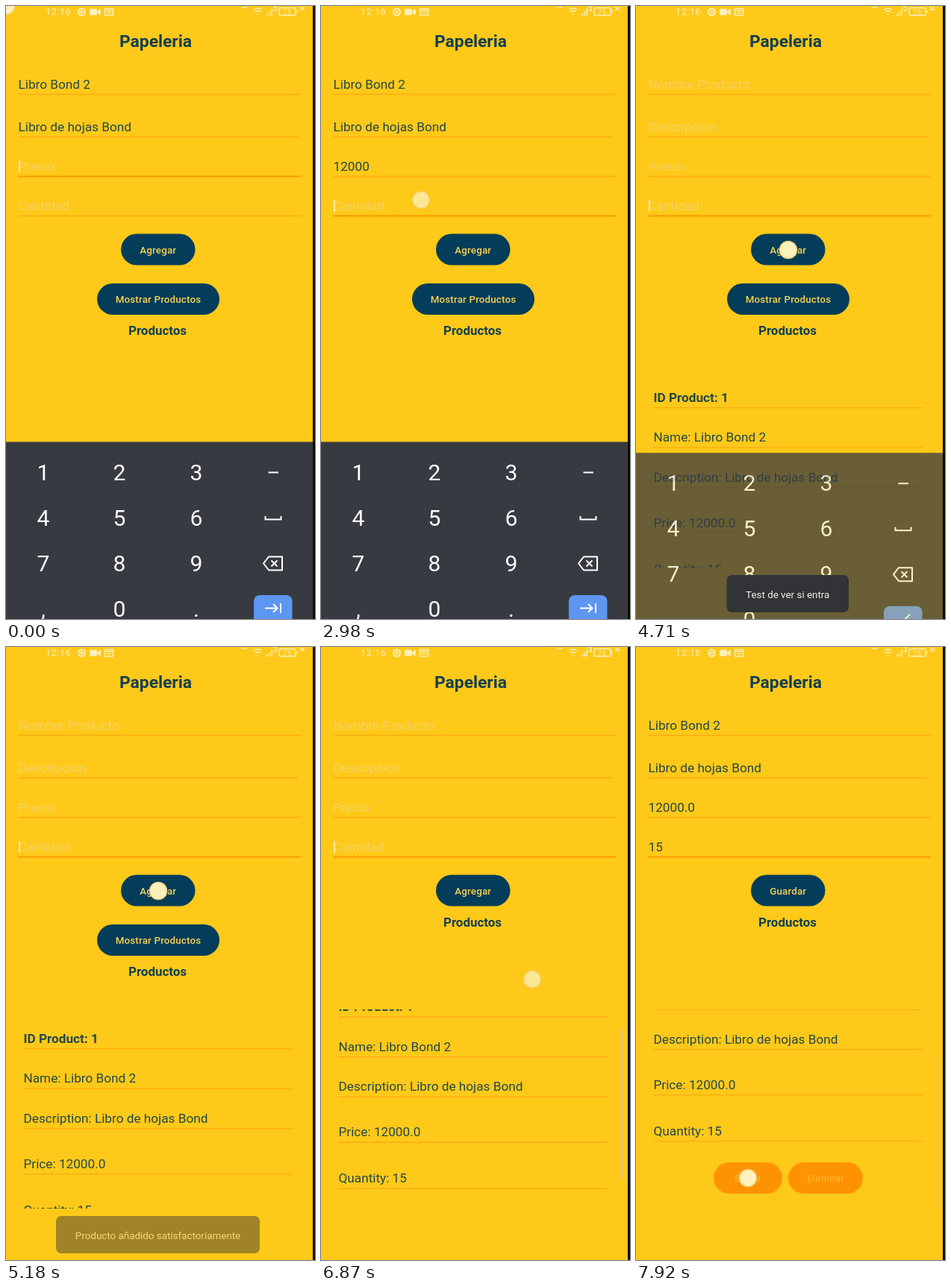
These frames come from a looping animation (414x822 px, 7990 ms). An HTML page:

```html
<!DOCTYPE html>
<html lang="es">
<head>
<meta charset="utf-8">
<title>Papeleria</title>
<style>
  html, body { margin: 0; width: 100%; height: 100%; overflow: hidden; background: #fec919; }
  svg { display: block; width: 414px; height: 822px; }
  text { font-family: Roboto, Arial, sans-serif; font-size: 17.2px; fill: #23474d; }
  .bold { font-weight: 700; fill: #123f50; text-anchor: middle; }
  .button { font-size: 13.3px; font-weight: 500; letter-spacing: .2px; fill: #fad252; text-anchor: middle; }
  .toast { font-size: 13.4px; fill: #f2eee6; text-anchor: middle; }
  .key { font-size: 30px; fill: #fff; text-anchor: middle; }
  .icon { fill: none; stroke: #fff; stroke-width: 2; }
  .status { fill: none; stroke: #fff0bd; stroke-width: 1.5; }
  .status text { font-size: 12.5px; fill: #fff0bd; stroke: none; letter-spacing: .6px; }
</style>
</head>
<body>
<svg id="stage" viewBox="0 0 414 822">
  <defs>
    <clipPath id="viewport"><rect y="486" width="411" height="267"/></clipPath>
  </defs>
  <rect width="414" height="822" fill="#fec919"/>
  <g class="status">
    <text x="53" y="12">12:16</text>
    <circle cx="101.500" cy="8" r="4.500" stroke-width="2"/>
    <circle cx="101.500" cy="8" r="1.500"/>
    <path d="M113 4.500h8v7h-8zM122 8l4-3v6z" fill="#fff0bd"/>
    <path d="M132.500 3.500h11v9h-11zM132 6h12M135 9h6"/>
    <path d="M316 2h7M332 5q5.500-4 11 0M334 8q3.500-2.500 7 0M337.500 10v2M350 13v-3M353 13V7M356 13V3M358 1h4v5h-4M394 1l6 5M400 1l-6 5"/>
    <rect x="366" y="2.500" width="22" height="10" rx="2"/>
    <path d="M390 6v3"/>
    <text x="371" y="11.500" style="font-size:9px">75</text>
  </g>
  <text class="bold" x="200.500" y="54.500" style="font-size:22.800px">Papeleria</text>
  <g id="form"></g>
  <g id="add"></g>
  <g id="show"></g>
  <text id="heading" class="bold" x="203" y="441" style="font-size:16.900px">Productos</text>
  <g id="list" clip-path="url(#viewport)">
    <path id="glow" d="M4 486H402Q398 496 378 498Q330 523 210 524Q80 523 28 499Q8 496 4 486Z" fill="#f6c33b"/>
    <g id="rows"></g>
    <rect id="bar" x="400" width="6" height="199" fill="#f0c55c"/>
  </g>
  <g id="keyboard">
    <rect y="584.500" width="411" height="240" fill="#373a40"/>
    <g id="keys"></g>
    <path class="icon" d="M351.500 625.500H365M347.500 684v4.500h21V684"/>
    <path class="icon" stroke-linejoin="round" d="M352 738.500h18v18h-18l-7-9zM355.500 743.500l8 8M363.500 743.500l-8 8"/>
    <rect x="332" y="790" width="51.500" height="50" rx="8" fill="#5e96f1"/>
    <path id="next" class="icon" d="M347 807.500h16M358 802l5.500 5.500-5.500 5.500M368 801v13"/>
    <path id="done" class="icon" d="M348 808l6 6 13-13"/>
  </g>
  <g id="toasts"></g>
  <circle id="touch" r="11.500" fill="#fff1bd" stroke="#edcf78" stroke-width="1.500"/>
  <rect x="411" width="3" height="822" fill="#0d0c07"/>
</svg>
<script>
const LOOP = 7990;
const $ = id => document.getElementById(id);

function add(parent, tag, attrs, text) {
  const node = document.createElementNS('http://www.w3.org/2000/svg', tag);
  for (const name in attrs) node.setAttribute(name, attrs[name]);
  if (text) node.textContent = text;
  return parent.appendChild(node);
}
const set = (node, name, value) => node.setAttribute(name, value);
const ramp = (t, from, to) => Math.min(1, Math.max(0, (t - from) / (to - from)));
const fade = (t, a, b, c, d) => ramp(t, a, b) * (1 - ramp(t, c, d));
const show = (node, visible) => set(node, 'opacity', +visible);

const fields = [
  { y: 105, line: 118.5, end: 395, hint: 'Nombre Producto' },
  { y: 162, line: 175.5, end: 391, hint: 'Descripcion' },
  { y: 215, line: 228.5, end: 395, hint: 'Precio' },
  { y: 268, line: 281.5, end: 395, hint: 'Cantidad' }
].map(field => ({
  ...field,
  label: add($('form'), 'text', { x: 16.5, y: field.y + 5.8 }),
  underline: add($('form'), 'path', { d: `M16.500 ${field.line}H${field.end}` })
}));
const caret = add($('form'), 'rect', { x: 17, width: 2, height: 16, fill: '#ffe9a4' });

function button(parent, x, y, width, label, fill = '#033d59', color = '#fad252') {
  add(parent, 'rect', { x, y, width, height: 42, rx: 21, fill });
  return add(parent, 'text', { class: 'button', x: x + width / 2, y: y + 26, style: `fill:${color}` }, label);
}
const addLabel = button($('add'), 154, 305.5, 99.5, 'Agregar');
button($('show'), 122, 372, 164, 'Mostrar Productos');

[
  [527, 'ID Product: 1'],
  [580.5, 'Name: Libro Bond 2'],
  [634, 'Description: Libro de hojas Bond'],
  [695, 'Price: 12000.0'],
  [757, 'Quantity: 15']
].forEach(([y, label], i) => {
  add($('rows'), 'text', { x: 23.5, y: y + 5.8, 'font-weight': i ? 400 : 700 }, label);
  add($('rows'), 'path', { d: `M23 ${y + 13.7}H384`, stroke: '#fcab13', 'stroke-width': 1.3 });
});
button($('rows'), 104, 799, 92, 'Editar', '#ff9200', '#ffb42c');
button($('rows'), 204, 799, 100, 'Eliminar', '#ff9200', '#ffb42c');

['123', '456', '789', ',0.'].forEach((row, r) => [...row].forEach((key, c) =>
  add($('keys'), 'text', { class: 'key', x: [50, 152, 255][c], y: 635.5 + r * 61 }, key)));

function toast(x, width, label) {
  const group = add($('toasts'), 'g', {});
  add(group, 'rect', { x, y: 763, width, height: 50, rx: 7, fill: '#323336' });
  add(group, 'text', { class: 'toast', x: x + width / 2, y: 793.5 }, label);
  return group;
}
const testToast = toast(121.5, 163.5, 'Test de ver si entra');
const savedToast = toast(67, 273, 'Producto añadido satisfactoriamente');

// start, end, x, y, vertical travel
const touches = [
  [1600, 1690, 50, 625, 0],
  [1840, 1930, 152, 625, 0],
  [2100, 2190, 152, 808, 0],
  [2310, 2400, 152, 808, 0],
  [2520, 2610, 152, 808, 0],
  [2900, 3040, 134, 260, 0],
  [3250, 3330, 50, 625, 0],
  [3660, 3750, 152, 686, 0],
  [4010, 4120, 204, 327, 0],
  [5430, 5550, 290, 575, 52],
  [6330, 6430, 204, 393, 0],
  [6778, 6960, 283, 490, -87],
  [7600, 7700, 150, 712, 0]
];
const priceKeys = [1620, 1860, 2120, 2330, 2540];

function fieldValues(t) {
  if (t >= 7740) return ['Libro Bond 2', 'Libro de hojas Bond', '12000.0', '15'];
  if (t >= 4230) return ['', '', '', ''];
  const typed = priceKeys.filter(at => t >= at).length;
  return ['Libro Bond 2', 'Libro de hojas Bond', '12000'.slice(0, typed),
    t < 3260 ? '' : t < 3750 ? '1' : '15'];
}

function drawForm(t) {
  const values = fieldValues(t);
  const focus = t < 2940 ? 2 : 3;
  fields.forEach((field, i) => {
    field.label.textContent = values[i] || field.hint;
    field.label.style.fill = values[i] ? '#23474d' : '#f5d266';
    set(field.underline, 'stroke', i === focus ? '#fa9902' : '#fcab13');
    set(field.underline, 'stroke-width', i === focus ? 2 : 1.3);
  });
  const blinkedOff = (t >= 670 && t < 1170) || (t >= 1470 && t < 1600);
  show(caret, !values[focus] && !blinkedOff);
  set(caret, 'y', fields[focus].y - 8);
  addLabel.textContent = t < 7740 ? 'Agregar' : 'Guardar';
}

function drawList(t) {
  const scroll = t < 6960
    ? 87 * ramp(t, 6778, 6960)
    : 87 + 21 * (1 - (1 - ramp(t, 6960, 7250)) ** 2);
  show($('list'), t >= 4230);
  set($('rows'), 'transform', `translate(0 ${-scroll - (t < 5430 ? 2 : 0)})`);
  set($('glow'), 'opacity', fade(t, 5430, 5540, 5600, 6150) * .8);
  set($('bar'), 'y', 486 + scroll * .63);
  set($('bar'), 'opacity', Math.max(fade(t, 5430, 5510, 5900, 6200), fade(t, 6770, 6800, 7700, 7990)) * .8);
  const listed = t >= 6430;
  show($('show'), !listed);
  set($('heading'), 'y', listed ? 374.5 : 441);
}

function drawKeyboard(t) {
  const hide = ramp(t, 4640, 4920);
  set($('keyboard'), 'transform', `translate(0 ${hide * 58})`);
  set($('keyboard'), 'opacity', 1 - hide);
  show($('next'), t < 3040);
  show($('done'), t >= 3040);
}

function drawTouch(t) {
  const current = touches.find(([from, to]) => t >= from && t < to + 70);
  show($('touch'), current);
  if (!current) return;
  const [from, to, x, y, travel] = current;
  set($('touch'), 'cx', x);
  set($('touch'), 'cy', y + travel * ramp(t, from, to));
  set($('touch'), 'opacity', .75 * (1 - ramp(t, to, to + 70)));
}

function draw(t) {
  drawForm(t);
  drawList(t);
  drawKeyboard(t);
  set(testToast, 'opacity', fade(t, 4230, 4450, 4850, 5050));
  set(savedToast, 'opacity', fade(t, 5080, 5300, 6330, 6520));
  drawTouch(t);
}

const start = performance.now();
function tick() {
  draw((performance.now() - start) % LOOP);
  requestAnimationFrame(tick);
}
tick();
</script>
</body>
</html>
```
